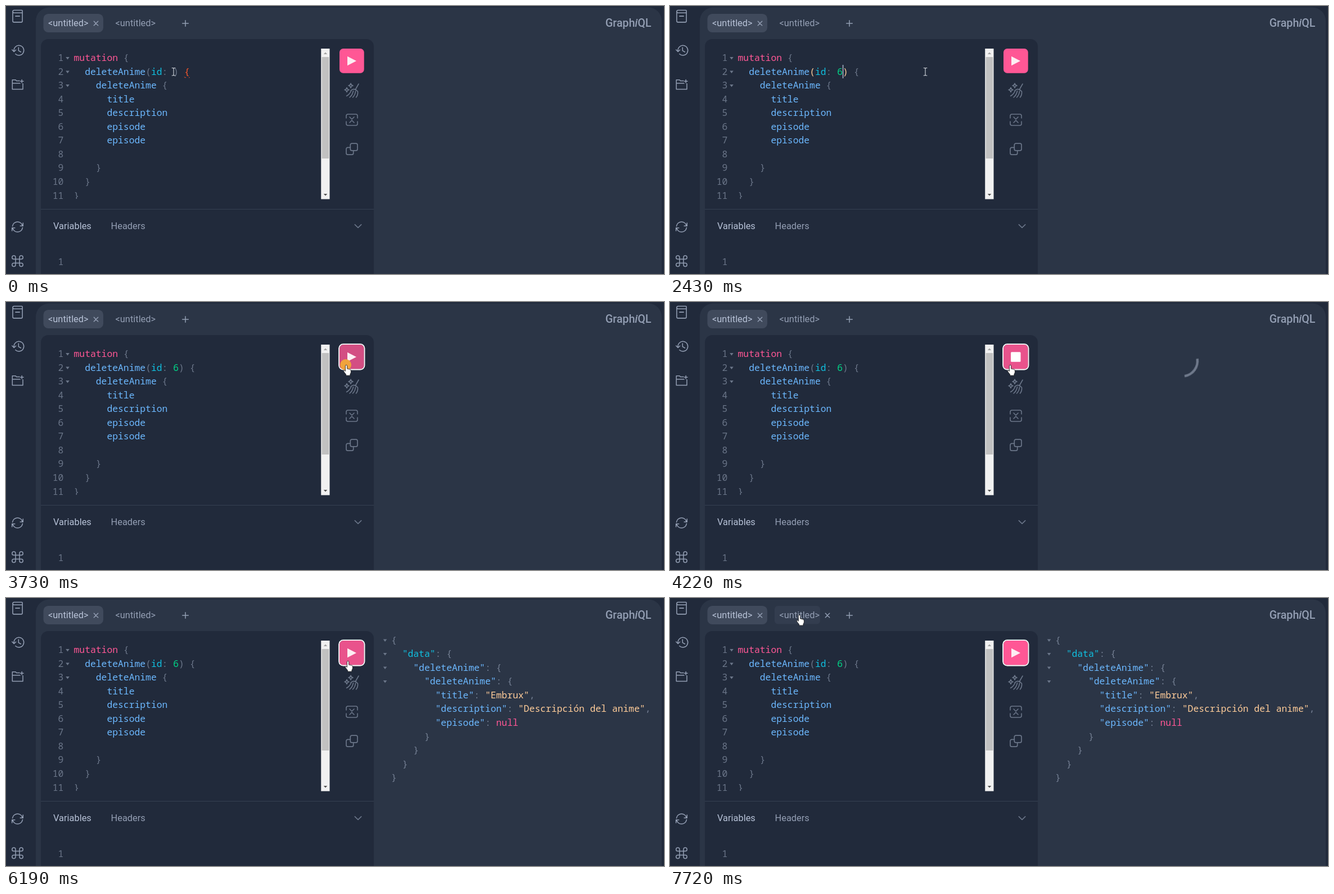
Recreate the animation shown at these times as an HTML page. Size 1170x478 px, loop 8 s.

```html
<!DOCTYPE html>
<html lang="es">
<head>
<meta charset="utf-8">
<title>Query editor</title>
<style>
  :root {
    --base: #212a3b; --panel: #2b3546; --text: #b7c2d7; --soft: #939eb3;
    --dim: #6b7689; --pink: #ff5795; --blue: #6cb8ff; --cyan: #10c0e0;
    --peach: #ffcc99; --green: #00d688; --red: #ff5729;
  }
  html, body { margin: 0; width: 100%; height: 100%; overflow: hidden; background: var(--base); }
  svg, pre { position: absolute; }
  svg { left: 0; top: 0; width: 1170px; height: 478px; font: 16.4px Roboto, sans-serif; }
  pre {
    margin: 0; overflow: hidden; color: var(--dim);
    font: 500 16.37px/24.55px "Noto Sans Mono", "DejaVu Sans Mono", monospace;
    font-variant-ligatures: none;
  }
  pre i { font-style: normal; }
  .code { left: 120.5px; top: 80.1px; width: 430px; height: 264.4px; }
  .nums { left: 82.7px; top: 80.1px; height: 264.4px; }
  .vars { left: 92.5px; top: 443.5px; }
  #result { left: 685px; top: 62.7px; color: #758094; }
  .k { color: var(--pink); } .p { color: var(--blue); } .d { color: var(--cyan); }
  .s { color: var(--peach); } .n { color: var(--green); }
  .e { color: var(--red); text-decoration: underline wavy 1px; text-underline-offset: 1px; }
  .line { fill: none; stroke: var(--soft); stroke-width: 1.5; stroke-linecap: round; stroke-linejoin: round; }
  .tool { stroke: var(--dim); stroke-width: 1.6; }

  /* One shared 8 s clock; percentages are ms / 80. */
  .a { animation: 8s step-end infinite; }
  #empty { position: absolute; animation-name: empty; }
  #filled { animation-name: filled; }
  .br { animation-name: bracket; }
  #caret { animation-name: caret; }
  #run { animation-name: run; }
  #ring { animation-name: ring; }
  #play { animation-name: play; }
  #stop, #wait { animation-name: busy; }
  #spin { animation-name: spin; transform-origin: 910.7px 105.3px; }
  #result { animation-name: result; }
  #folds { animation-name: folds; }
  #click { animation-name: press; }
  .tab { animation-name: tab; }
  #mouse { animation-name: mouse; }
  #beam { animation-name: beam; }
  #arrow { animation-name: arrow; }
  #hand { animation-name: hand; }

  @keyframes empty { 0% { visibility: visible } 18.125%, to { visibility: hidden } }
  @keyframes filled { 0% { visibility: hidden } 18.125%, to { visibility: visible } }
  @keyframes bracket { 0%, 46.625%, to { color: var(--dim) } .875% { color: var(--peach) } }
  @keyframes caret {
    0%, 46.625%, to { opacity: 0; transform: none }
    .875% { opacity: 1; transform: none }
    11.75% { opacity: 0; transform: none }
    18.125%, 29.5%, 44.125% { opacity: 1; transform: translateX(9.8px) }
    25.375%, 37.25% { opacity: 0; transform: translateX(9.8px) }
  }
  @keyframes run {
    0%, 78.125%, to { fill: var(--pink) }
    39%, 49.25% { fill: #e9538c }
    46.625% { fill: #d34e83 }
  }
  @keyframes ring { 0% { visibility: hidden } 46.625%, to { visibility: visible } }
  @keyframes play { 0%, 63.375%, to { visibility: visible } 49.25% { visibility: hidden } }
  @keyframes busy { 0%, 63.375%, to { visibility: hidden } 49.25% { visibility: visible } }
  @keyframes spin {
    0% { transform: rotate(0) }
    49.25% { transform: rotate(0); animation-timing-function: steps(13) }
    60.625%, to { transform: rotate(410deg) }
  }
  @keyframes result { 0% { visibility: hidden } 63.375%, to { visibility: visible } }
  @keyframes folds { 0% { visibility: hidden } 67.125%, to { visibility: visible } }
  @keyframes press { 0%, 49.25%, to { visibility: hidden } 46.625% { visibility: visible } }
  @keyframes tab { 0% { visibility: hidden } 94.1%, to { visibility: visible } }
  @keyframes beam { 0%, 79% { visibility: visible } 36.375%, 88%, to { visibility: hidden } }
  @keyframes arrow { 0%, 39%, 79%, 93.3%, to { visibility: hidden } 36.375%, 78.125%, 88% { visibility: visible } }
  @keyframes hand { 0%, 78.125% { visibility: hidden } 39%, 93.3%, to { visibility: visible } }
  @keyframes mouse {
    0% { transform: translate(298px, 117px) }
    23.375% { transform: translate(301px, 117px) }
    24.375% { transform: translate(312px, 117px) }
    25.375% { transform: translate(328px, 117px) }
    26.5% { transform: translate(345px, 117px) }
    27.5% { transform: translate(358px, 117px) }
    29.5% { transform: translate(400px, 117px) }
    30.375% { transform: translate(454px, 117px) }
    31.375% { transform: translate(515px, 117px) }
    32.25% { transform: translate(550px, 117px) }
    36.375% { transform: translate(559px, 117px) }
    37.25% { transform: translate(571px, 118px) }
    38.125% { transform: translate(584px, 118px) }
    39% { transform: translate(594px, 116px) }
    39.875% { transform: translate(600px, 115px) }
    40.75% { transform: translate(603px, 113px) }
    41.625% { transform: translate(605px, 112.6px) }
    77.375% { transform: translate(608px, 112.6px) }
    78.125% { transform: translate(650px, 122px) }
    79% { transform: translate(715px, 133px) }
    79.75% { transform: translate(785px, 145px) }
    80.625% { transform: translate(835px, 153px) }
    81.375% { transform: translate(864px, 158px) }
    87.125% { transform: translate(800px, 140px) }
    88% { transform: translate(660px, 95px) }
    88.75% { transform: translate(500px, 60px) }
    89.625% { transform: translate(370px, 37px) }
    92.5% { transform: translate(345px, 37px) }
    93.3% { transform: translate(318px, 36px) }
    94.1% { transform: translate(285px, 34px) }
    94.9% { transform: translate(260px, 33px) }
    95.7% { transform: translate(240px, 31px) }
    96.5%, to { transform: translate(230px, 30.4px) }
  }
</style>
</head>
<body>
<svg viewBox="0 0 1170 478">
  <defs>
    <path id="fold" d="M-3.3-2H3.3L0 2.6z" fill="#6b7689"/>
    <path id="loop" d="M-3.5-3.5H-6.6A3.1 3.1 0 1 1-3.5-6.6z"/>
    <path id="cross" d="M-3.7-3.7 3.7 3.7M3.7-3.7-3.7 3.7"/>
    <path id="star" d="M0-4Q.6-.6 4 0 .6.6 0 4-.6.6-4 0-.6-.6 0-4z"/>
  </defs>

  <!-- Panels -->
  <rect x="53" y="2.5" width="1113" height="520" rx="24" fill="#2b3546"/>
  <rect x="62" y="59" width="592" height="440" rx="13" fill="#212a3b"/>
  <path d="M62 362.5H654" stroke="#364052"/>

  <!-- Tabs and titles -->
  <rect x="66.5" y="14" width="106.5" height="33" rx="8.7" fill="#404a5c"/>
  <rect class="a tab" x="186" y="14" width="81" height="32.5" rx="6" fill="#333d4f"/>
  <g fill="#939eb3">
    <text x="75" y="36" fill="#b7c2d7">&lt;untitled&gt;</text>
    <text x="194.5" y="36">&lt;untitled&gt;</text>
    <text x="84" y="398" fill="#b7c2d7">Variables</text>
    <text x="186.5" y="398">Headers</text>
    <text x="1065.7" y="37" font-size="19.65" font-weight="500">Graph<tspan font-style="italic">i</tspan>QL</text>
  </g>
  <g class="line">
    <use href="#cross" x="160" y="31"/>
    <use class="a tab" href="#cross" x="280" y="31"/>
    <path d="M313.7 31H324.3M319 25.7V36.3"/>
  </g>

  <!-- Sidebar -->
  <g class="line">
    <g transform="translate(11.2 6.7) scale(1.04)">
      <path d="M.75 3A2.25 2.25 0 0 1 3 .75H16.25A1 1 0 0 1 17.25 1.75V19.3A2 2 0 0 1 15.25 21.3H2.75A2 2 0 0 1 .75 19.3V3A2.25 2.25 0 0 0 3 5.25H17.25M5.5 11H12.5"/>
    </g>
    <path d="M14.2 80.5A8.8 8.8 0 1 1 16.8 85.5M10.8 78 14.2 81.4 17.7 78.2M22.3 74V79.7L26.5 82"/>
    <path d="M24 133.5H18.5L17 131.8H11.3V148.5H30V138.5M11.3 137.8H25M28.2 131.5V137M25.5 134.2H31"/>
    <g transform="translate(8.9 382.4) scale(1.45)" stroke-width="1.05">
      <path d="M14.1 6.6A6.25 6.25 0 0 0 1.8 7.2M11.25 6.75H14.75V3.25M1.9 9.4A6.25 6.25 0 0 0 14.2 8.8M4.75 9.25H1.25V12.75"/>
    </g>
    <g transform="translate(20.5 455)">
      <path d="M-3.5-3.5H3.5V3.5H-3.5z"/>
      <use href="#loop"/><use href="#loop" transform="rotate(90)"/>
      <use href="#loop" transform="rotate(180)"/><use href="#loop" transform="rotate(270)"/>
    </g>
  </g>

  <!-- Editor tools -->
  <g class="line tool">
    <path d="M627 139 621 149.5M613 151Q619 145 625.5 152.5M614 150.5Q611 158 605.5 160.5M617.5 151.5Q616 159 611 163M621.5 152Q621 158.5 616.5 163M625.5 152.5Q626 159 622.5 163"/>
    <use href="#star" x="613" y="142"/><use href="#star" x="606" y="149.5"/>
    <path d="M605 200V196A3 3 0 0 1 608 193H622A3 3 0 0 1 625 196V200M605 206V210A3 3 0 0 0 608 213H622A3 3 0 0 0 625 210V206M611 198 615 202 619 198M611 208 615 204 619 208"/>
    <g transform="translate(604.1 244.2) scale(1.21)" stroke-width="1.4">
      <rect x="6.75" y=".75" width="10.5" height="10.5" rx="2.2"/>
      <path d="M6.75 6.75H2.95A2.2 2.2 0 0 0 .75 8.95V15.05A2.2 2.2 0 0 0 2.95 17.25H9.05A2.2 2.2 0 0 0 11.25 15.05V11.25"/>
    </g>
    <path d="M620.3 389.8 626 395.3 631.7 389.8"/>
  </g>

  <!-- Run button -->
  <rect id="run" class="a" x="593" y="76" width="43.7" height="43.7" rx="6.6"/>
  <rect id="ring" class="a" x="592.1" y="75.1" width="45.4" height="45.4" rx="7.5" fill="none" stroke="#fff" stroke-width="1.8"/>
  <path id="play" class="a" d="M607 89.8 623 98 607 106.2z" fill="#fdeef3"/>
  <rect id="stop" class="a" x="606" y="89.2" width="17.5" height="17.5" rx="1.5" fill="#fff"/>

  <!-- Scrollbar -->
  <path d="M560.2 76H575.5V344.5H560.2z" fill="#f1f1f1"/>
  <path d="M561.6 91H574.2V272H561.6z" fill="#c1c1c1"/>
  <path d="M564.8 86H571.2L568 82.5z" fill="#a3a3a3"/>
  <path d="M564.8 335H571.2L568 338.5z" fill="#505050"/>

  <!-- Fold marks -->
  <use href="#fold" x="109.5" y="93"/><use href="#fold" x="109.5" y="117.5"/><use href="#fold" x="109.5" y="142"/>
  <g id="folds" class="a">
    <use href="#fold" x="674" y="75.5"/><use href="#fold" x="674" y="100"/>
    <use href="#fold" x="674" y="124.5"/><use href="#fold" x="674" y="149"/>
  </g>

  <!-- Spinner -->
  <g id="wait" class="a">
    <path id="spin" class="a" d="M891.5 86.1A27.2 27.2 0 0 1 929.9 86.1" fill="none" stroke="#6f798b" stroke-width="4.3"/>
  </g>
</svg>

<pre class="nums"> 1
 2
 3
 4
 5
 6
 7
 8
 9
10
11</pre>
<pre class="code"><i class="k">mutation</i> {
  <i class="p">deleteAnime</i><i class="a br">(</i><i class="d">id</i>: <i id="empty" class="a"><i class="a br">)</i> <i class="e">{</i></i><i id="filled" class="a"><i class="n">6</i><i class="a br">)</i> {</i>
    <i class="p">deleteAnime</i> {
      <i class="p">title</i>
      <i class="p">description</i>
      <i class="p">episode</i>
      <i class="p">episode</i>

    }
  }
}</pre>
<pre class="vars">1</pre>
<pre id="result" class="a">{
  <i class="d">"data"</i>: {
    <i class="p">"deleteAnime"</i>: {
      <i class="p">"deleteAnime"</i>: {
        <i class="p">"title"</i>: <i class="s">"Embrux"</i>,
        <i class="p">"description"</i>: <i class="s">"Descripción del anime"</i>,
        <i class="p">"episode"</i>: <i class="k">null</i>
      }
    }
  }
}</pre>

<!-- Caret and pointer -->
<svg viewBox="0 0 1170 478">
  <rect id="caret" class="a" x="297" y="105" width="1.4" height="24" fill="#b7c2d7"/>
  <circle id="click" class="a" cx="604" cy="112" r="10" fill="#f0a33c"/>
  <g id="mouse" class="a">
    <path id="beam" class="a" d="M-3.3-6.5H-1L0-5.5 1-6.5H3.3M0-5.5V6M-3.3 7H-1L0 6 1 7H3.3" fill="none" stroke="#d5d9e0" stroke-width="1.1"/>
    <path id="arrow" class="a" d="M0 0V13.5L3.1 10.7 5.3 15.8 7.4 14.9 5.2 10H9.6z" fill="#fff" stroke="#111" stroke-width=".7"/>
    <path id="hand" class="a" d="M-1.6 1.4A1.6 1.6 0 0 1 1.6 1.4V6.4L6.2 7.4Q8.4 7.9 8.4 10V13.2L6.9 16.2V18.6H-.4V16.6L-4.4 11.6Q-5.4 9.6-3.6 9.1L-1.6 10.8z" fill="#fff" stroke="#111" stroke-width=".8"/>
  </g>
</svg>
</body>
</html>
```
